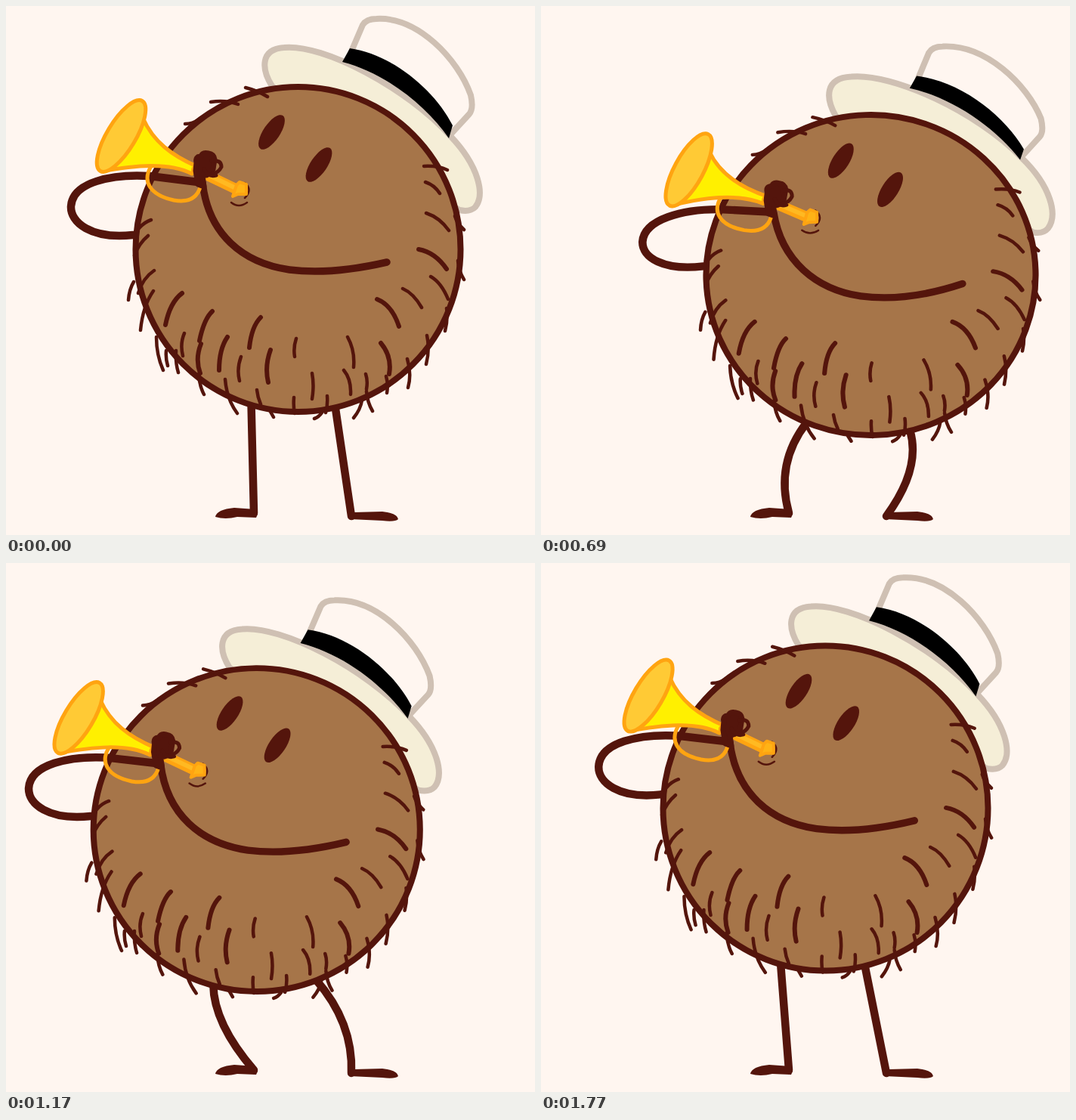
An HTML page for the animation above (1800 ms loop, 700 by 700 pixels).

```html
<!DOCTYPE html>
<html lang="en">
<head>
<meta charset="utf-8">
<title>Coconut trumpeter</title>
<style>
  html, body { margin: 0; width: 100%; height: 100%; overflow: hidden; background: #fff6f0; }
  svg { display: block; width: 100vw; height: 100vh; }
  path, ellipse, circle { stroke-linecap: round; stroke-linejoin: round; }
  .ink { fill: none; stroke: #54150c; }
  .solid { fill: #54150c; }
  .trim { stroke: #cfc0b3; stroke-width: 8; }
  .brass { stroke: #ffa411; stroke-width: 5; }
</style>
</head>
<body>
<svg viewBox="0 0 700 700">
  <g class="ink" stroke-width="10.5">
    <path id="legL"/>
    <path id="legR"/>
  </g>
  <path class="solid" d="M277 676Q279 666 302 664L330 666Q335 670 331 677L306 676Q290 680 277 676Z"/>
  <path class="solid" d="M452 676Q453 669 460 670L498 669Q518 671 519 679Q515 683 498 681L455 679Z"/>
  <g id="hat"></g>
  <g id="body">
    <circle r="215" fill="#a67549" stroke="#54150c" stroke-width="8"/>
    <g class="ink" transform="translate(-386.5 -322)">
      <path id="furBold" stroke-width="6"/>
      <path id="furFine" stroke-width="4.5"/>
      <path id="furRim" stroke-width="4.5"/>
    </g>
  </g>
  <g id="face"></g>
</svg>
<script>
const LOOP = 1800, HALF = 900, STEP = 30;
const $ = id => document.getElementById(id);
const mix = (a, b, u) => a + (b - a) * u;

$('furBold').setAttribute('d',
  'M233 380q-16 12-22 42M273 404q-11 10-17 39M337 412q-12 12-15 40M293 438q-11 16-11 44' +
  'M350 455q-8 22-3 43M496 446q15 18 11 41M491 388q20 8 29 36M546 322q22 4 37 26M258 447q-8 20-1 39');
$('furFine').setAttribute('d',
  'M384 440q-4 12-2 24M452 438q10 18 8 40M525 374q14 6 25 25M562 358q14 8 23 30M556 274q18 6 30 23' +
  'M555 233q12 4 19 15M553 212q18-1 31 5M236 433q-6 14-2 30M311 464q-6 16-2 32M405 486q3 16 0 34' +
  'M447 482q10 12 9 32M332 508q1 10 5 19M381 518q-1 12 1 21M425 516q1 12-2 22M476 487q3 9 1 20' +
  'M196 350q-15 10-21 30M188 304q-12 10-18 26M192 283q-9 3-16 11');
$('furRim').setAttribute('d',
  'M169 365q-6 10-7 24M195 377q-14 20-17 52M199 438q0 24 9 44M212 456q-1 10 2 20M225 456q-1 16 3 29' +
  'M255 487q1 16 7 27M290 494q2 26 16 45M350 537l4 7M418 538q-4 6-10 8M471 522q-2 12-11 23' +
  'M477 510q1 14 8 26M503 490q3 10 1 22M531 467q6 20 1 38M557 436q4 18-1 38M583 400q2 14-2 30' +
  'M598 337q1 14 8 25M594 278q3 10 12 18M317 108q16 4 29 12M271 127q20-3 36 3M237 156q10 0 18-6');

// Every part of the face and hat has two extreme poses: tilted back and tilted forward.
const parts = [];
function part(group, attrs, back, forward) {
  const el = document.createElementNS('http://www.w3.org/2000/svg', 'path');
  for (const name in attrs) el.setAttribute(name, attrs[name]);
  $(group).append(el);
  const target = forward.match(/-?[\d.]+/g).map(Number);
  parts.push(u => {
    let i = 0;
    el.setAttribute('d', back.replace(/-?[\d.]+/g, n => mix(+n, target[i++], u).toFixed(2)));
  });
}
function oval(group, attrs, rx, back, forward) {
  const el = document.createElementNS('http://www.w3.org/2000/svg', 'ellipse');
  for (const name in attrs) el.setAttribute(name, attrs[name]);
  el.setAttribute('rx', rx);
  $(group).append(el);
  parts.push(u => {
    const [x, y, ry, angle] = back.map((n, i) => mix(n, forward[i], u));
    el.setAttribute('ry', ry);
    el.setAttribute('transform', `translate(${x} ${y}) rotate(${angle})`);
  });
}
const ink = width => ({ class: 'ink', 'stroke-width': width });

// Hat: crown, brim, band
part('hat', { class: 'trim', fill: '#fff6f0' },
  'M457 60L472 25Q477 17 490 17C545 14 598 70 615 118Q619 136 613 143L590 168',
  'M471 88L482 54Q486 45 500 44C560 41 618 86 641 126Q645 141 641 147L622 172');
part('hat', { class: 'trim', fill: '#f5eed7' },
  'M352 106C338 84 336 57 368 55C420 50 530 108 588 172C626 212 634 250 621 266Q614 273 600 270L480 200Z',
  'M356 154C342 120 346 94 390 93C450 88 562 119 622 174C662 206 674 246 661 270Q656 280 648 280L530 230Z');
part('hat', { fill: '#000' },
  'M455 56C512 64 568 112 591 158L586 175C555 130 500 88 445 74Z',
  'M470 85C530 88 590 128 624 170L620 175C582 138 525 106 464 96Z');

// Eyes and smile
oval('face', { class: 'solid' }, 11, [351.5, 167, 26.5, 34], [386, 207.5, 27, 23]);
oval('face', { class: 'solid' }, 11, [414, 210, 26.5, 34], [457, 231.5, 27, 23]);
part('face', ink(9.5),
  'M260 234C268 302 313 340 375 349Q430 356 504 339',
  'M310 284C328 340 375 378 420 387Q500 399 567 348');

// Arm
part('face', ink(10.5),
  'M168 303C112 309 85 286 86 265C88 233 140 222 190 225L254 233',
  'M219 367C180 375 148 372 148 352C150 326 200 306 236 297L304 285');

// Trumpet
part('face', ink(2.5),
  'M316 234Q327 243 316 254M298 260Q308 268 319 260',
  'M360 273Q374 284 361 296M344 301Q355 307 367 302');
part('face', { class: 'brass', fill: 'none' },
  'M192 212C180 232 190 250 222 257Q250 262 257 240',
  'M238 272C228 290 240 308 270 311Q300 314 306 292');
part('face', { class: 'brass', fill: '#fff000' },
  'M181 148C195 180 220 198 252 212L246 222C215 206 170 211 126 219Z',
  'M209 218C220 240 250 258 298 264L298 273C260 267 215 273 172 296Z');
oval('face', { class: 'brass', fill: '#ffca35' }, 19, [152.5, 172, 54, 31], [188.5, 244.5, 54, 17]);
part('face', { fill: 'none', stroke: '#ffa411', 'stroke-width': 14 },
  'M252 217L306 243', 'M300 269L352 284');
part('face', { fill: 'none', stroke: '#ffb922', 'stroke-width': 6 },
  'M252 216L306 242', 'M300 268L352 283');
part('face', { fill: '#ffb316', stroke: '#ffa411', 'stroke-width': 4 },
  'M300 252L307 249L318 249L318 236L309 233L305 237Z',
  'M348 294L354 292L362 290L362 276L354 272L350 275Z');

// Hand
part('face', { class: 'solid', stroke: '#54150c', 'stroke-width': 7 },
  'M252 207Q250 199 258 199Q260 193 268 195Q275 196 276 203L274 216Q268 226 260 224L262 239L254 236L251 218Z',
  'M301 258Q298 250 306 249Q309 243 316 246Q323 246 325 254L322 267Q316 278 309 276L309 288L301 286L299 268Z');
part('face', ink(5),
  'M272 205Q285 203 285 213Q281 221 273 222M262 216Q268 227 278 224',
  'M319 256Q331 247 331 262Q328 270 320 272M310 268Q315 279 323 274');

// Half a loop of body motion: time, sway, height, knee bend, squash. The second half sways the other way.
const keys = [
  [0, 0, 322, 0, 0], [60, 18, 331, 4, .014], [150, 44, 349, 13, .012], [240, 54, 354.5, 15, .007],
  [345, 54, 346, 6, 0], [450, 55, 338, 0, 0], [500, 58, 336, 0, 0], [575, 64, 342, 2, .002],
  [630, 60, 350, 9, .008], [690, 50, 356, 15, .014], [780, 29, 344, 7, .006], [870, 10, 324.5, 0, 0]
];
function keyAt(i) {
  const lap = Math.floor(i / keys.length);
  const [t, sway, ...rest] = keys[i - lap * keys.length];
  return [t + lap * HALF, lap % 2 ? -sway : sway, ...rest];
}
function motion(t) {
  let i = 0;
  while (keyAt(i + 1)[0] <= t) i++;
  const [p, a, b, n] = [-1, 0, 1, 2].map(k => keyAt(i + k));
  const span = b[0] - a[0], s = (t - a[0]) / span;
  return [1, 2, 3, 4].map(c => {
    const ma = (b[c] - p[c]) / (b[0] - p[0]) * span;
    const mb = (n[c] - a[c]) / (n[0] - a[0]) * span;
    return mix(a[c], b[c], s * s * (3 - 2 * s)) + s * (1 - s) * (ma * (1 - s) - mb * s);
  });
}

function leg(id, cx, cy, offset, footX, footY, bend) {
  const x = cx + offset, y = cy + Math.sqrt(213 ** 2 - offset ** 2);
  const kneeX = (x + footX) / 2 + 2 * bend, kneeY = (y + footY) / 2 - Math.abs(bend) * .4;
  $(id).setAttribute('d', `M${x} ${y}Q${kneeX} ${kneeY} ${footX} ${footY}`);
}

function draw(t) {
  const [sway, cy, bend, squash] = motion(t);
  const cx = 386.5 + sway;
  const nod = Math.cos(2 * Math.PI * t / 600);
  const u = (1 - nod) / 1.81;
  const place = q => `translate(${cx} ${cy}) scale(${1 + q} ${1 - q})`;

  parts.forEach(update => update(u));
  // The forward pose is already drawn slightly squashed.
  const headPlace = `${place(squash - .007 * u)} translate(${-mix(386.5, 439.5, u)} ${-mix(322, 354.5, u)})`;
  $('hat').setAttribute('transform', headPlace);
  $('face').setAttribute('transform', headPlace);
  $('body').setAttribute('transform', `${place(squash)} rotate(${4.25 * (nod - 1)})`);
  leg('legL', cx, cy, -62 - .25 * sway - .7 * bend, 328, 671, -bend);
  leg('legR', cx, cy, 49 - .27 * sway + 1.1 * bend, 457, 675, bend);
}

const start = performance.now();
function tick() {
  const t = (performance.now() - start) % LOOP;
  draw(Math.floor(t / STEP) * STEP);
  requestAnimationFrame(tick);
}
tick();
</script>
</body>
</html>
```
